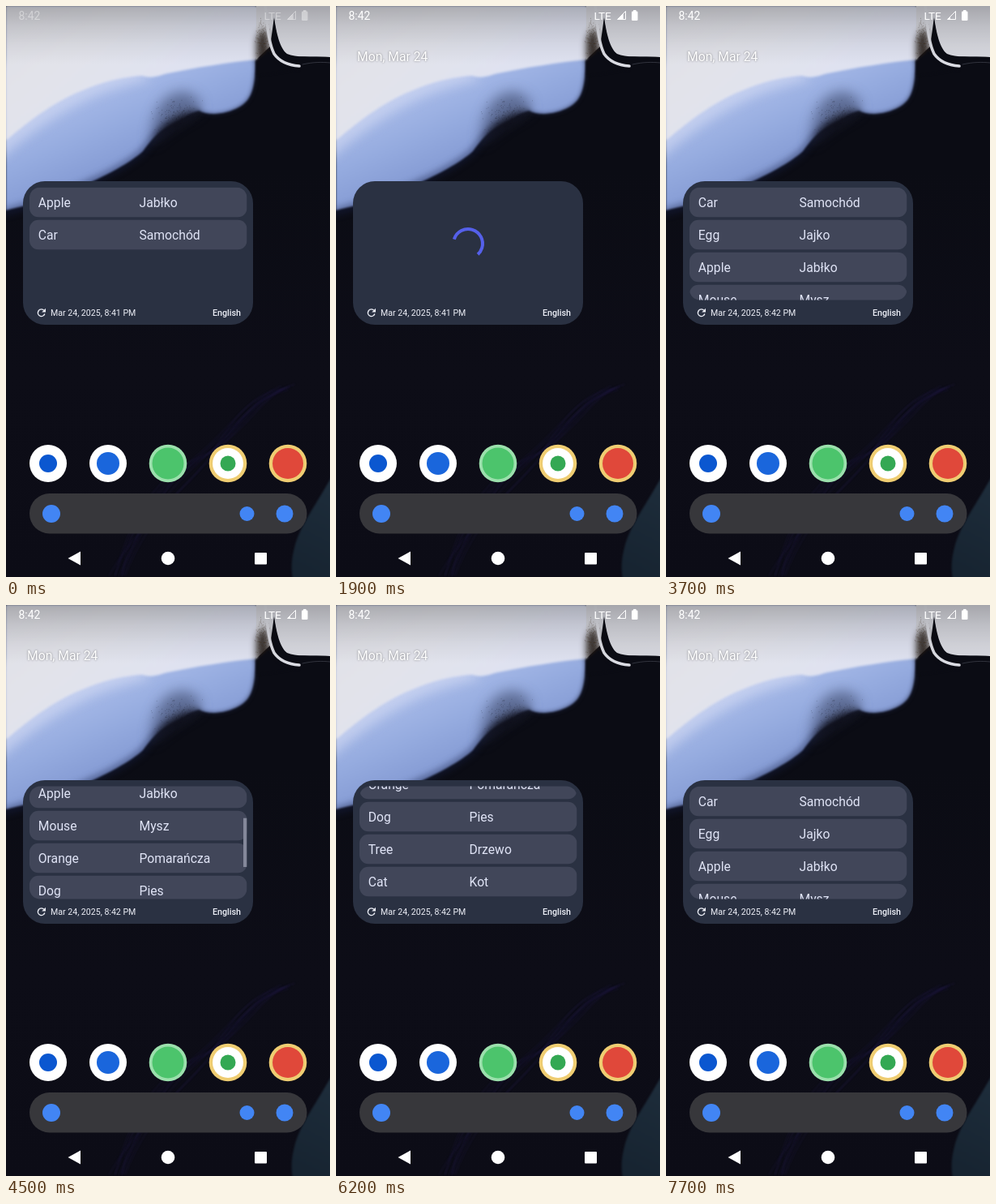
An HTML page with a canvas for the animation above (7.8 s loop, 400 by 704 pixels).

```html
<!DOCTYPE html>
<html lang="en">
<head>
<meta charset="utf-8">
<title>Vocabulary widget</title>
<style>
html, body { margin: 0; width: 100%; height: 100%; overflow: hidden; background: #0a0b13; }
canvas { display: block; width: 400px; height: 704px; }
</style>
</head>
<body>
<canvas id="stage"></canvas>
<script>
const W = 400, H = 704, LOOP = 7800;
const FONT = 'Roboto, "Open Sans", sans-serif';
const canvas = document.getElementById('stage');
const dpr = window.devicePixelRatio || 1;
const ctx = setup(canvas);

const OLD_WORDS = [['Apple', 'Jabłko'], ['Car', 'Samochód']];
const WORDS = [['Car', 'Samochód'], ['Egg', 'Jajko'], ['Apple', 'Jabłko'], ['Mouse', 'Mysz'],
  ['Orange', 'Pomarańcza'], ['Dog', 'Pies'], ['Tree', 'Drzewo'], ['Cat', 'Kot']];

const LIST = { x: 29, y: 223.5, w: 268.5, h: 139 };
const PITCH = 40;
const MAX_SCROLL = WORDS.length * PITCH - LIST.h;
const REFRESH = 1800, LOADED = 3300;

function setup(c) {
  c.width = W * dpr;
  c.height = H * dpr;
  const g = c.getContext('2d');
  g.scale(dpr, dpr);
  return g;
}

const clamp = v => Math.max(0, Math.min(1, v));
const ramp = (t, a, b) => clamp((t - a) / (b - a));
const smooth = v => v * v * (3 - 2 * v);
const ease = (t, a, b) => smooth(ramp(t, a, b));

function random(seed) {
  return () => (seed = (seed * 16807) % 2147483647) / 2147483647;
}

function disc(x, y, r, color) {
  ctx.fillStyle = color;
  ctx.beginPath();
  ctx.arc(x, y, r, 0, Math.PI * 2);
  ctx.fill();
}

function box(x, y, w, h, r, color) {
  ctx.fillStyle = color;
  ctx.beginPath();
  ctx.roundRect(x, y, w, h, r);
  ctx.fill();
}

function text(str, x, y, size, color, weight = 400, align = 'left') {
  ctx.font = `${weight} ${size}px ${FONT}`;
  ctx.textAlign = align;
  ctx.fillStyle = color;
  ctx.fillText(str, x, y);
}

function gradient(g, x0, y0, x1, y1, ...colors) {
  const fill = g.createLinearGradient(x0, y0, x1, y1);
  colors.forEach((c, i) => fill.addColorStop(i / (colors.length - 1), c));
  return fill;
}

function shape(g, path, fill, blur = 0) {
  g.save();
  if (blur) g.filter = `blur(${blur * dpr}px)`;
  g.fillStyle = fill;
  g.fill(new Path2D(path));
  g.restore();
}

function line(g, path, color, width, blur = 0) {
  g.save();
  if (blur) g.filter = `blur(${blur * dpr}px)`;
  g.strokeStyle = color;
  g.lineWidth = width;
  g.lineCap = 'round';
  g.stroke(new Path2D(path));
  g.restore();
}

function dust(g, count, x, y, sx, sy, color, rnd) {
  g.fillStyle = color;
  for (let i = 0; i < count; i++) {
    const dx = rnd() + rnd() + rnd() - 1.5, dy = rnd() + rnd() + rnd() - 1.5;
    g.fillRect(x + dx * sx, y + dy * sy, 0.9, 0.9);
  }
}

function makeWallpaper() {
  const c = document.createElement('canvas');
  const g = setup(c);
  const rnd = random(77);
  g.fillStyle = gradient(g, 0, 200, 0, H, '#0b0c14', '#0d0d17', '#0c0c16');
  g.fillRect(0, 0, W, H);

  // blue wave, darker along its lower edge
  const leftEdge = 'C30 245 75 232 107 216 C138 202 158 189 169 179 C178 167 186 156 200 148';
  const rightEdge = 'C215 140 226 132 238 129 C252 136 272 133 287 125 C302 117 308 104 308 66';
  shape(g, `M0 252 ${leftEdge} ${rightEdge} V0 H0 Z`,
    gradient(g, 125, 75, 180, 205, '#aec0ec', '#95abdf', '#7e94cf'), 1.2);
  line(g, `M0 254 ${leftEdge}`, 'rgba(24,34,72,.55)', 7, 4);
  line(g, `M200 148 ${rightEdge}`, 'rgba(30,38,70,.4)', 4, 2);
  // smoky hollow
  shape(g, 'M178 172 C180 140 186 112 214 106 C236 106 243 120 238 130 C224 138 204 147 178 172 Z', 'rgba(52,60,92,.55)', 8);
  shape(g, 'M182 168 C190 146 208 130 240 127 C226 142 208 152 182 168 Z', 'rgba(13,14,23,.85)', 5);
  dust(g, 160, 210, 136, 26, 20, 'rgba(20,20,30,.25)', rnd);

  // pale upper field, soft towards the left
  shape(g, 'M-20 200 C25 158 70 128 112 110 C140 99 165 94 180 90 L150 70 H-20 Z', 'rgba(214,221,243,.6)', 7);
  shape(g, 'M0 166 C30 140 62 116 102 101 C125 92 148 87 168 86 C180 90 188 86 200 83 ' +
    'C235 76 270 70 311 66 L312 0 H0 Z',
    gradient(g, 0, 0, 120, 150, '#dfdfe5', '#e2e3ea', '#dfe2f0'), 1.4);

  // upper right field, smoke and glossy rim
  shape(g, 'M309 0 H400 V63 C375 62 358 64 347 59 C338 52 334 34 331 14 L326 50 L309 66 Z', '#d9dae1', 0.6);
  shape(g, 'M309 68 L309 44 C312 30 318 26 322 32 L328 68 Z', 'rgba(30,22,18,.85)', 4);
  dust(g, 120, 316, 40, 8, 22, 'rgba(66,48,30,.4)', rnd);
  shape(g, 'M309 68 L325 54 L336 72 L362 78 L309 86 Z', '#0b0c14', 1.5);
  shape(g, 'M331 16 C334 38 338 55 349 61 C365 64 385 62 400 63 V78 H345 C333 68 328 46 331 16 Z', '#0b0c14', 0.6);
  line(g, 'M320 0 C323 25 324 45 331 59 C338 69 348 73 362 74', '#dcdde4', 3.6, 0.6);
  line(g, 'M366 72 C380 69 390 69 400 70', 'rgba(90,92,105,.5)', 1, 0.5);

  // faint violet strands
  for (let i = 0; i < 8; i++) {
    const j = () => (rnd() - 0.5) * 22;
    line(g, `M${345 + j()} ${470 + j() / 3} C${300 + j()} ${482 + j()} ${285 + j()} ${525 + j()} ${245 + j()} 556 ` +
      `S${165 + j()} ${625 + j()} ${138 + j()} 702`, 'rgba(44,36,88,.24)', 1.4, 0.8);
  }
  shape(g, 'M402 580 C386 610 362 642 356 668 C352 684 352 694 354 706 H402 Z',
    gradient(g, 354, 690, 400, 600, '#172431', '#1d2c3a'), 1);

  // system bar shade
  g.fillStyle = gradient(g, 0, 0, 0, 72, 'rgba(0,0,0,.24)', 'rgba(0,0,0,.13)', 'rgba(0,0,0,.05)', 'rgba(0,0,0,0)');
  g.fillRect(0, 0, W, 72);
  return c;
}

function drawStatus(t) {
  ctx.save();
  ctx.globalAlpha = t < 100 ? 0.4 : 1;
  text('8:42', 15.5, 16.5, 13.9, '#fff');
  text('LTE', 318.5, 16.5, 13.6, '#fff');
  const level = t < 2000 ? 0.72 : 0.35;
  ctx.strokeStyle = '#fff';
  ctx.lineWidth = 1;
  ctx.beginPath();
  ctx.moveTo(357.5, 6.5);
  ctx.lineTo(357.5, 16.5);
  ctx.lineTo(347.5, 16.5);
  ctx.closePath();
  ctx.stroke();
  ctx.fillStyle = '#fff';
  ctx.beginPath();
  ctx.moveTo(347.5, 16.5);
  ctx.lineTo(347.5 + 10 * level, 16.5 - 10 * level);
  ctx.lineTo(347.5 + 10 * level, 16.5);
  ctx.fill();
  box(365, 6.5, 7.5, 11.5, 1.2, '#fff');
  box(367, 5, 3.5, 2, 0.5, '#fff');
  ctx.restore();

  if (t < 100) return;
  ctx.save();
  ctx.shadowColor = 'rgba(0,0,0,.45)';
  ctx.shadowBlur = 2.5 * dpr;
  ctx.shadowOffsetY = 0.8 * dpr;
  text('Mon, Mar 24', 26, 67.5, 15.7, '#fff');
  ctx.restore();
}

function drawRefreshIcon() {
  ctx.strokeStyle = '#eef0f8';
  ctx.lineWidth = 1.4;
  ctx.beginPath();
  ctx.arc(43.7, 378.2, 4.3, 0.3, 5.5);
  ctx.stroke();
  ctx.fillStyle = '#eef0f8';
  ctx.beginPath();
  ctx.moveTo(49, 372.8);
  ctx.lineTo(49, 377.6);
  ctx.lineTo(44.2, 377.6);
  ctx.fill();
}

function scrollAt(t) {
  return MAX_SCROLL * (ease(t, 4000, 5005) - ease(t, 6350, 6950));
}

function stretchAt(t) {
  return 1 + 0.034 * (ease(t, 5000, 5250) - ease(t, 5250, 5700));
}

function barAlpha(t) {
  const down = ramp(t, 4000, 4050) - ramp(t, 5780, 6030);
  const up = ramp(t, 6350, 6400) - ramp(t, 7250, 7500);
  return Math.max(down, up);
}

function drawList(words, t) {
  const scroll = scrollAt(t), bottom = LIST.y + LIST.h;
  ctx.save();
  ctx.beginPath();
  ctx.roundRect(LIST.x, LIST.y, LIST.w, LIST.h, 13);
  ctx.clip();
  ctx.translate(0, bottom);
  ctx.scale(1, stretchAt(t));
  ctx.translate(0, -bottom);
  words.forEach(([word, meaning], i) => {
    const y = 223.8 + i * PITCH - scroll;
    box(LIST.x, y, LIST.w, 36.5, 11, '#414659');
    text(word, 39.8, y + 24.2, 15.7, '#e0e4f6');
    text(meaning, 164.5, y + 24.2, 15.7, '#e0e4f6');
  });
  const alpha = barAlpha(t);
  if (alpha > 0) {
    const ratio = LIST.h / (WORDS.length * PITCH);
    ctx.globalAlpha = alpha;
    box(293, LIST.y + scroll * ratio, 4.5, LIST.h * ratio, 0, '#84889a');
  }
  ctx.restore();
}

function drawSpinner(t) {
  const cycle = 1333, phase = ((t - 1024) % cycle) / cycle;
  const base = -20 + (t - 2800) * 0.2295;
  const from = base + 270 * ease(phase, 0.5, 1);
  const to = base + 270 * ease(phase, 0, 0.5) + 4;
  ctx.strokeStyle = '#5560ea';
  ctx.lineWidth = 4;
  ctx.beginPath();
  ctx.arc(163, 293, 18, from * Math.PI / 180, to * Math.PI / 180);
  ctx.stroke();
}

function drawWidget(t) {
  box(21, 216, 284, 177, 27, '#2a3142');
  if (t < REFRESH) drawList(OLD_WORDS, t);
  else if (t < LOADED) drawSpinner(t);
  else drawList(WORDS, t);
  drawRefreshIcon();
  text(`Mar 24, 2025, 8:4${t < LOADED ? 1 : 2} PM`, 55, 382, 10.6, '#eef0f8');
  text('English', 290, 382, 10.7, '#eef0f8', 500, 'right');
}

function drawDock() {
  const y = 564;
  disc(52, y, 23, '#fff');
  disc(52, y, 11, '#0b57d0');
  disc(126, y, 23, '#fff');
  disc(126, y, 14, '#1a66dc');
  disc(200, y, 23.3, '#9be0ac');
  disc(200, y, 19.5, '#4cc46c');
  disc(274, y, 23.3, '#efcd72');
  disc(274, y, 19, '#fff');
  disc(274, y, 9.5, '#34a853');
  disc(348, y, 23.3, '#efcd72');
  disc(348, y, 19, '#e0483a');

  box(29, 601, 342.5, 49.5, 24.7, '#37373b');
  disc(56, 626, 11, '#4285f4');
  disc(297.5, 626, 9, '#4285f4');
  disc(344, 626, 10.5, '#4285f4');
}

function drawNav() {
  ctx.fillStyle = '#fff';
  ctx.beginPath();
  ctx.moveTo(76.5, 681);
  ctx.lineTo(92, 672.5);
  ctx.lineTo(92, 689.5);
  ctx.fill();
  disc(200, 681, 8.3, '#fff');
  box(307, 674, 15, 14.5, 1, '#fff');
}

const wallpaper = makeWallpaper();
const start = performance.now();

function frame() {
  const t = (performance.now() - start) % LOOP;
  ctx.drawImage(wallpaper, 0, 0, W, H);
  drawStatus(t);
  drawWidget(t);
  drawDock();
  drawNav();
  requestAnimationFrame(frame);
}
frame();
</script>
</body>
</html>
```
